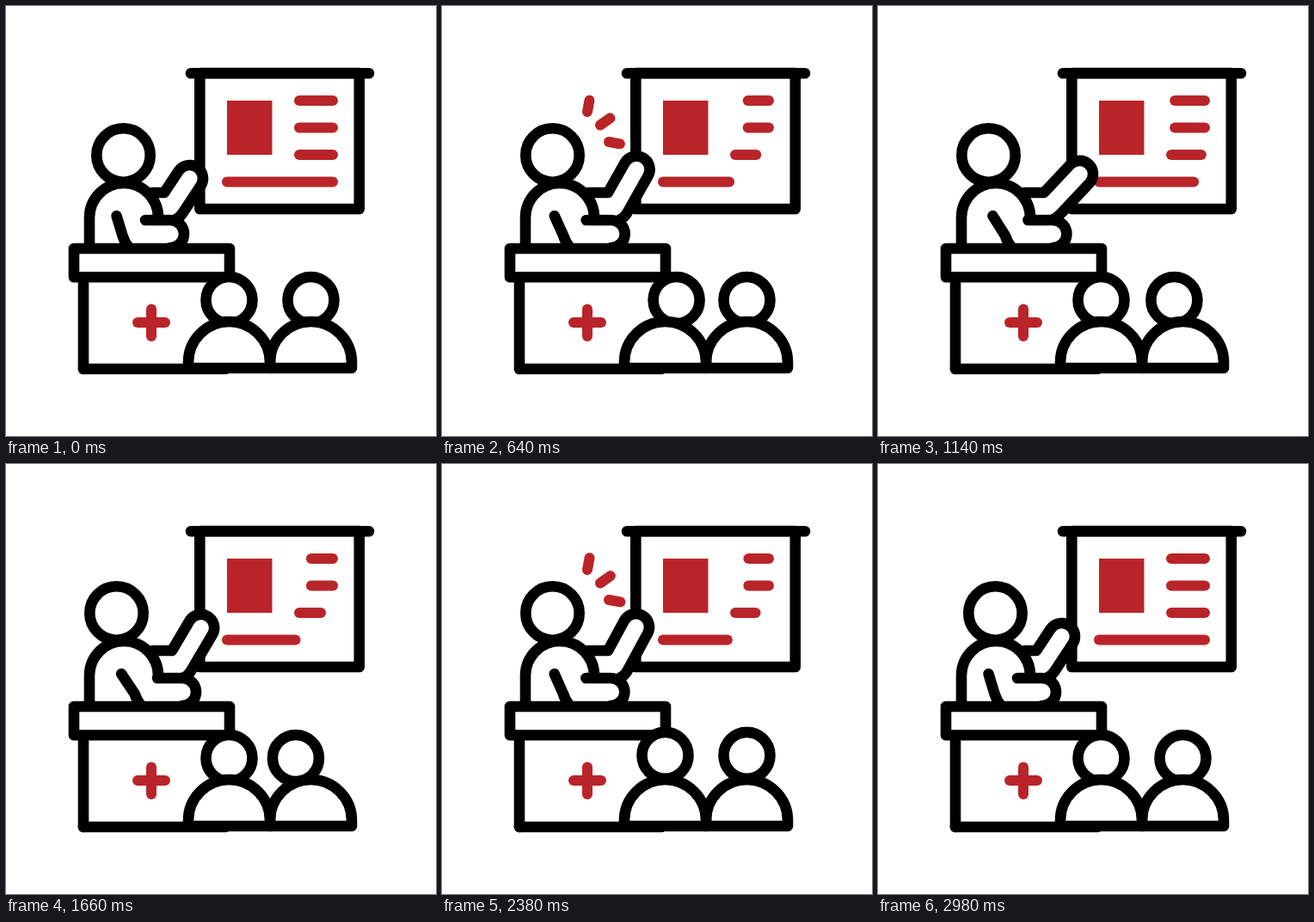
Animation of 500x500 px, one loop 3000 ms. Source, as an HTML page with a canvas:

```html
<!DOCTYPE html>
<html lang="en">
<head>
<meta charset="utf-8">
<title>Lecture</title>
<style>
  html, body { margin: 0; width: 100%; height: 100%; overflow: hidden; background: #fff; }
  canvas { display: block; width: 500px; height: 500px; }
</style>
</head>
<body>
<canvas id="stage" width="500" height="500"></canvas>
<script>
const ctx = document.getElementById('stage').getContext('2d');
const LOOP = 3000, RED = '#b92429', INK = '#000';

const clamp = x => Math.max(0, Math.min(1, x));
const mix = (a, b, k) => a + (b - a) * k;
const smooth = x => { x = clamp(x); return x * x * (3 - 2 * x); };
const smoother = x => { x = clamp(x); return x * x * x * (x * (x * 6 - 15) + 10); };

// Eases up between a and b, holds, eases down between c and d
const pulse = (t, a, b, c, d) => smooth((t - a) / (b - a)) * (1 - smooth((t - c) / (d - c)));

function stroke(color) {
  ctx.lineWidth = color === INK ? 12.6 : 12;
  ctx.strokeStyle = color;
  ctx.stroke();
}

function shape(build, fill = '#fff') {
  ctx.beginPath();
  build();
  if (fill) { ctx.fillStyle = fill; ctx.fill(); }
  stroke(INK);
}

function line(x1, y1, x2, y2, color = INK) {
  ctx.beginPath();
  ctx.moveTo(x1, y1);
  ctx.lineTo(x2, y2);
  stroke(color);
}

const circle = (x, y, r) => shape(() => ctx.arc(x, y, r, 0, 2 * Math.PI));
const box = (x, y, w, h) => shape(() => ctx.rect(x, y, w, h));

// 0 = lines long, 1 = lines short and arm raised
function swing(t) {
  const half = LOOP / 6, step = Math.floor(t / half);
  const k = smoother(t / half - step);
  return step % 2 ? 1 - k : k;
}

function drawScreen(cut) {
  box(225.3, 78, 185.5, 158);
  line(215, 78.2, 422, 78.2);
  ctx.fillStyle = RED;
  ctx.fillRect(257, 110, 52.5, 63);
  const short = cut * 0.32;
  line(341 + short, 110, 380, 110, RED);
  line(341 + short, 141.5, 380, 141.5, RED);
  line(341, 173, 380 - short, 173, RED);
  line(257, 204.5, 380 - cut, 204.5, RED);
}

function drawRays(k) {
  if (k < 0.01) return;
  const ray = (x, y, dx, dy) => line(x, y, x + dx * k, y + dy * k, RED);
  ray(169, 123, 3.3, -18);
  ray(184, 138.5, 15.5, -11);
  ray(194, 158, 17.5, 3.2);
}

// Two parallel edges joined by a round hand
function drawArm(elbow, x, y) {
  const r = 15.5, dx = x - elbow, dy = y - 217;
  const angle = Math.atan2(dy, dx) - Math.asin(r / Math.hypot(dx, dy));
  const c = Math.cos(angle), s = Math.sin(angle);
  const edge = h => x - s * r + (h - y - c * r) * c / s;
  shape(() => {
    ctx.moveTo(170, 217);
    ctx.lineTo(elbow, 217);
    ctx.arc(x, y, r, angle - Math.PI / 2, angle + Math.PI / 2);
    ctx.lineTo(edge(241), 241);
    ctx.quadraticCurveTo(edge(246), 246, edge(246) - 6, 249);
  });
}

function drawBody() {
  shape(() => {
    ctx.moveTo(97, 282);
    ctx.lineTo(97, 246);
    ctx.arc(137, 246, 40, Math.PI, 0);
  });
}

function drawForearm(q) {
  shape(() => {
    ctx.moveTo(128.5 + q * 0.4, 244);
    ctx.lineTo(135.5 + q, 267);
    ctx.quadraticCurveTo(138 + q, 275, 143 + q, 281);
  }, null);
  shape(() => {
    ctx.moveTo(162 + q, 249);
    ctx.lineTo(191 + q, 249);
    ctx.arc(191 + q, 265, 16, -Math.PI / 2, Math.PI / 2);
  });
}

function drawPodium() {
  line(90, 315, 90, 422);
  line(90, 422, 255, 422);
  box(79, 282, 181, 33.3);
  line(153, 368, 185, 368, RED);
  line(169, 352.5, 169, 384, RED);
}

function drawListener(x, dx, dy) {
  circle(x + dx, 342 + dy, 27);
  shape(() => {
    ctx.moveTo(x - 47.5, 421);
    ctx.arc(x, 414.5, 47.5, Math.PI, 0);
    ctx.lineTo(x + 47.5, 421);
    ctx.closePath();
  });
}

function draw(t) {
  ctx.fillStyle = '#fff';
  ctx.fillRect(0, 0, 500, 500);
  ctx.lineCap = ctx.lineJoin = 'round';

  const lean = pulse(t, 0, 500, 2500, 3000);
  const up = swing(t);
  const outer = t < 500 || t > 2500;
  const rest = outer ? [213.5, 200.5] : [236.2, 196.4];
  const cut = mix(outer ? 0 : 6.5, 52.3, up);
  const rays = pulse(t, 60, 380, 480, 960) + pulse(t, 1680, 2000, 2230, 2710);
  const reach = 14.5 * pulse(t, 0, 1500, 1500, 3000);
  const nod = -4 * pulse(t, 2100, 2500, 2500, 2900);

  drawScreen(cut);
  drawRays(rays);
  drawArm(184 + 9 * lean, mix(rest[0], 224.4, up), mix(rest[1], 189, up));
  circle(136.5 - 8 * lean, 173.5, 31.2);
  drawBody();
  drawForearm(reach);
  drawPodium();
  drawListener(354.5, -19 * pulse(t, 870, 1390, 1600, 1960), nod);
  drawListener(259.5, 18 * pulse(t, 0, 450, 480, 950), nod);
}

const start = performance.now();
function tick() {
  draw((performance.now() - start) % LOOP);
  requestAnimationFrame(tick);
}
tick();
</script>
</body>
</html>
```
